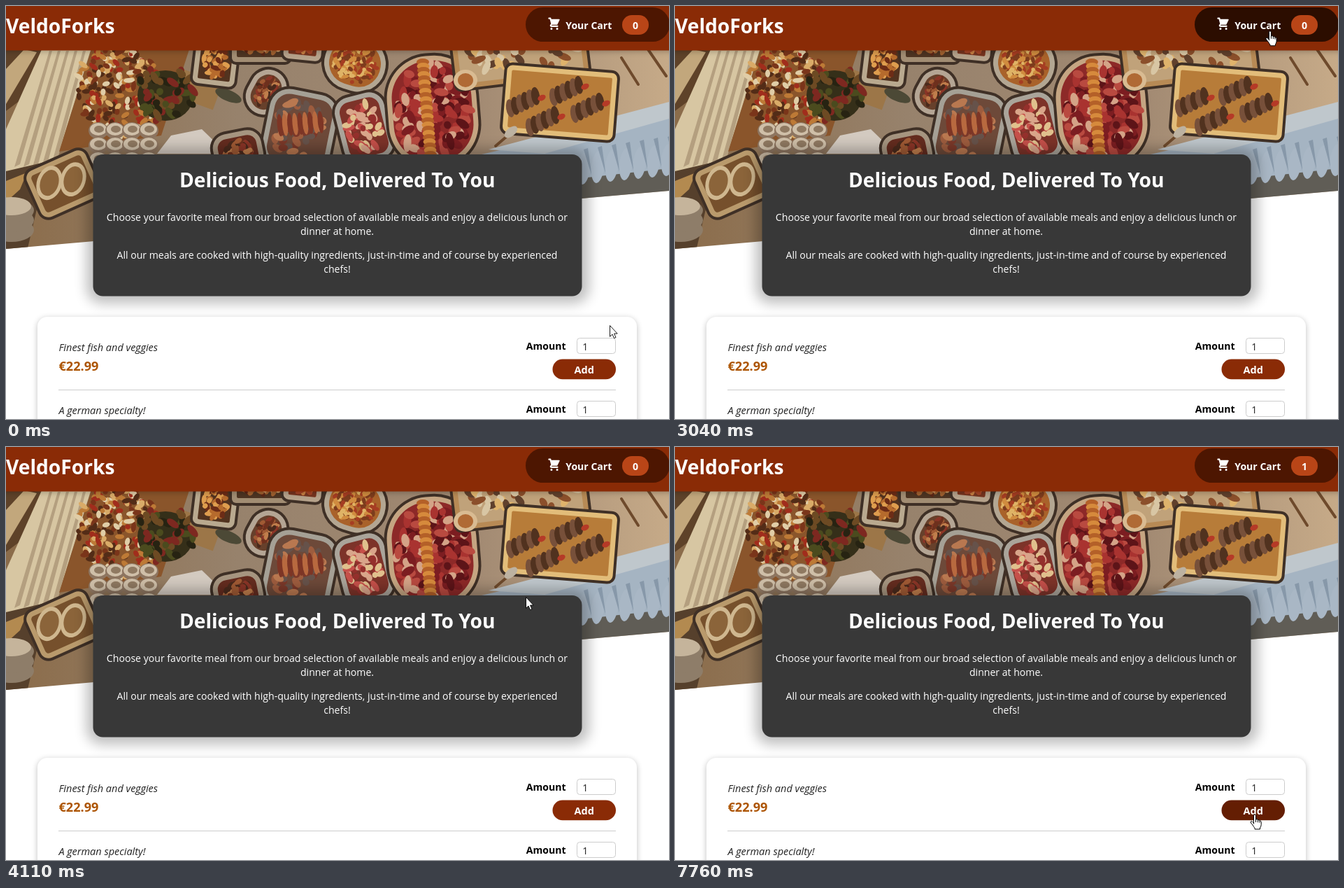
An HTML page with a canvas for the animation above (8 s loop, 948 px wide and 590 px high).

```html
<!DOCTYPE html>
<html lang="en">
<head>
<meta charset="utf-8">
<title>VeldoForks</title>
<style>
html, body { margin: 0; width: 100%; height: 100%; overflow: hidden; background: #fff; }
canvas, svg { position: absolute; left: 0; top: 0; width: 948px; height: 590px; }
text { font-family: "Open Sans", "Noto Sans", sans-serif; font-size: 14.08px; white-space: pre; }
.b { font-weight: 700; }
.mid { text-anchor: middle; }
.end { text-anchor: end; }
.desc { font-style: italic; font-size: 14.5px; fill: #222; }
.price { font-size: 18.1px; fill: #ad5502; }
.big { font-size: 28.2px; }
.w { fill: #fff; }
</style>
</head>
<body>
<canvas id="photo" width="948" height="590"></canvas>
<svg viewBox="0 0 948 590">
  <defs>
    <filter id="soft" x="-20%" y="-40%" width="140%" height="180%"><feGaussianBlur stdDeviation="9"/></filter>
    <filter id="thin" x="-10%" y="-50%" width="120%" height="200%"><feGaussianBlur stdDeviation="4"/></filter>
  </defs>

  <rect x="115" y="203" width="719" height="222" rx="22" opacity=".25" filter="url(#soft)"/>
  <rect x="124.5" y="212" width="699" height="202.5" rx="14" fill="#383838"/>
  <g class="w mid">
    <text class="b big" x="473.7" y="258.7">Delicious Food, Delivered To You</text>
    <text x="473.5" y="307.3">Choose your favorite meal from our broad selection of available meals and enjoy a delicious lunch or</text>
    <text x="473.5" y="326.8">dinner at home.</text>
    <text x="473.5" y="361.2">All our meals are cooked with high-quality ingredients, just-in-time and of course by experienced</text>
    <text x="473.5" y="380.8">chefs!</text>
  </g>

  <g id="meals">
    <rect x="45" y="446" width="857" height="220" rx="14" opacity=".25" filter="url(#thin)"/>
    <rect x="45" y="444" width="857" height="220" rx="14" fill="#fff"/>
    <g id="rows"></g>
    <path d="M75 548.5H872" stroke="#ccc"/>
    <g id="focus">
      <rect x="817" y="475" width="54" height="21" rx="4" fill="none" stroke="#101010" stroke-width="2"/>
      <path id="caret" d="M832.5 477V495" stroke="#000"/>
    </g>
    <g id="spin">
      <rect x="855" y="477" width="14" height="18" fill="#efefef"/>
      <rect id="half" x="855" y="477" width="14" height="9" fill="#cfcfcf"/>
      <path d="M858.5 483.5l3.5-4 3.5 4zM858.5 488.5l3.5 4 3.5-4z" fill="#505050"/>
    </g>
  </g>

  <rect x="-20" y="2" width="988" height="63" opacity=".25" filter="url(#thin)"/>
  <rect width="948" height="63.5" fill="#8a2b06"/>
  <text class="b big w" x="0" y="38.7">VeldoForks</text>
  <rect id="cart" x="743" y="2" width="206" height="49" rx="24.5"/>
  <path class="w" transform="translate(773.3 15.6) scale(1.02)" d="M3 1a1 1 0 0 0 0 2h1.2l1.7 6.7-.9.9C3.7 11.8 4.6 14 6.4 14H15a1 1 0 0 0 0-2H6.4l1-1H14a1 1 0 0 0 .9-.6l3-6A1 1 0 0 0 17 3H6.3L6 1.8A1 1 0 0 0 5 1zM16 16.5a1.5 1.5 0 1 1-3 0 1.5 1.5 0 0 1 3 0zM6.5 18a1.5 1.5 0 1 0 0-3 1.5 1.5 0 0 0 0 3z"/>
  <text class="b w" x="800.3" y="32.5">Your Cart</text>
  <rect x="881" y="13" width="38" height="28" rx="14" fill="#b94517"/>
  <text id="badge" class="b w mid" x="900" y="32.5">0</text>

  <g id="overlay">
    <rect width="948" height="590" opacity=".75"/>
    <g id="modal">
      <rect x="176.7" width="624.6" height="125.3" rx="14" fill="#fff"/>
      <text class="b" x="191.3" y="54" style="font-size:21.1px">Total Amount</text>
      <text class="b end" x="786.3" y="54" style="font-size:21.8px">$0.00</text>
      <rect id="close" x="689" y="74.5" width="97" height="35.5" rx="17.7" stroke="#8a2b06"/>
      <text id="closeText" class="mid" x="737.5" y="98.5">Close</text>
    </g>
  </g>

  <g id="mouse" stroke="#000" stroke-linejoin="round" fill="#fff">
    <path id="arrow" d="M.5 .5V16.3L4 13 6.5 18.6 9 17.5 6.6 12H11.2Z" stroke-width=".9"/>
    <path id="hand" transform="translate(-7 -.5)" d="M5.5 14V2Q5.5 .5 7 .5T8.5 2V8Q9 7 10.3 7.3 11.3 7.5 11.4 8.6 12 8 13 8.3 14 8.6 14 9.8 14.7 9.3 15.4 9.7 16.2 10 16.2 11.2V15Q16 18 14.5 19.5V21.5H7V20Q5.5 18 4 15.5L1.5 12.5Q.5 11 1.6 10.4 2.8 9.8 4 11L5.5 12.7M8.5 7.5V11.5M11.4 8.6V11.8M14 9.8V12.2"/>
  </g>
</svg>
<script>
const LOOP = 8000;
const $ = id => document.getElementById(id);
const show = (id, on) => $(id).setAttribute('visibility', on ? 'inherit' : 'hidden');

function row(y, desc, price, id) {
  return `<text class="desc" x="75.5" y="${y + 19.3}">${desc}</text>
    <text class="b price" x="75.5" y="${y + 47}">${price}</text>
    <text class="b" x="743.7" y="${y + 17.3}">Amount</text>
    <rect x="816.5" y="${y + .5}" width="55" height="22" rx="4" fill="#fff" stroke="#ccc"/>
    <text id="value${id}" x="824.3" y="${y + 17.5}" fill="#222">1</text>
    <rect id="add${id}" x="781.5" y="${y + 30.5}" width="90.5" height="28.7" rx="14.3" fill="#8a2b06"/>
    <text class="b mid w" x="826.7" y="${y + 50.5}" style="font-size:14.5px">Add</text>`;
}
$('rows').innerHTML = row(474, 'Finest fish and veggies', '€22.99', 1) +
  row(564, 'A german specialty!', '€16.50', 2);

function paintPhoto() {
  const c = $('photo').getContext('2d');
  let seed = 11;
  const rnd = () => (seed = (seed * 16807) % 2147483647) / 2147483647;
  const poly = (col, ...p) => {
    c.fillStyle = col;
    c.beginPath();
    for (let i = 0; i < p.length; i += 2) c.lineTo(p[i], p[i + 1]);
    c.fill();
  };
  const oval = (x, y, rx, ry, col, rot = 0) => {
    c.fillStyle = col;
    c.beginPath();
    c.ellipse(x, y, rx, ry, rot, 0, 7);
    c.fill();
  };
  const at = (x, y, rot, fn) => {
    c.save(); c.translate(x, y); c.rotate(rot); fn(); c.restore();
  };
  const bits = (rx, ry, n, size, cols) => {
    for (let i = 0; i < n; i++) {
      const a = rnd() * 6.28, r = Math.sqrt(rnd());
      oval(Math.cos(a) * r * rx, Math.sin(a) * r * ry, size * (.6 + rnd()), size * .7,
        cols[i % cols.length], rnd() * 3);
    }
  };
  const tray = (x, y, w, h, rot, round, rim, base, n, size, cols) => at(x, y, rot, () => {
    [['#3f3026', 4], [rim, 0], [base, -7]].forEach(([col, g]) => {
      c.fillStyle = col;
      c.beginPath();
      c.roundRect(-w / 2 - g, -h / 2 - g, w + 2 * g, h + 2 * g, Math.max(2, round + g));
      c.fill();
    });
    bits(w / 2 - 12, h / 2 - 12, n, size, cols);
  });

  poly('#fff', 0, 0, 948, 0, 948, 590, 0, 590);
  c.save();
  c.beginPath();
  [[0, 60], [948, 60], [948, 264], [0, 347]].forEach(p => c.lineTo(...p));
  c.clip();

  const cloth = c.createLinearGradient(0, 0, 948, 0);
  cloth.addColorStop(0, '#8b6c4a');
  cloth.addColorStop(.35, '#97826c');
  cloth.addColorStop(.7, '#a18972');
  cloth.addColorStop(1, '#c6aa88');
  poly(cloth, 0, 60, 948, 60, 948, 350, 0, 350);

  // left side: chairs, draped linen, plates
  poly('#5e4229', 0, 60, 70, 60, 40, 120, 0, 150);
  poly('#c2a77c', 0, 90, 26, 62, 44, 66, 0, 140);
  poly('#d7c6a2', 52, 60, 122, 60, 74, 214, 0, 246, 0, 176);
  for (let i = 0; i < 5; i++) poly('#b49f7f', 62 + i * 12, 64, 66 + i * 12, 64, 20 + i * 13, 226, 12 + i * 13, 230);
  poly('#56402c', 0, 236, 60, 222, 30, 350, 0, 350);
  poly('#b38a50', 0, 250, 30, 238, 20, 262, 0, 280);
  [320, 306, 292].forEach(y => oval(8, y, 32, 17, '#8e7d69'));
  oval(8, 286, 28, 13, '#c5b49b');

  // appetiser platter, vase and cups
  poly('#8a552b', 122, 62, 262, 62, 222, 185, 76, 208);
  at(164, 120, -.35, () => bits(62, 68, 230, 5, ['#bd7a36', '#7a351a', '#d9ab68', '#532c17', '#a12d1c', '#e0cda7']));
  at(276, 121, .35, () => { c.fillStyle = '#9c7648'; c.fillRect(-34, -21, 62, 40); });
  oval(228, 128, 40, 36, '#352f19');
  at(228, 124, 0, () => bits(42, 40, 60, 7, ['#4b4b1e', '#272312', '#6d4a23', '#7d2820']));
  for (let i = 0; i < 12; i++) {
    const x = 132 + i % 4 * 24, y = 178 + (i >> 2) * 21;
    oval(x, y, 14, 12, '#8d7560');
    oval(x, y - 2, 12, 9, '#cfbfa8');
    oval(x + 1, y - 2, 7, 5, '#8f7961');
  }
  poly('#d3cac0', 216, 211, 236, 185, 280, 176, 316, 211);
  oval(318, 128, 20, 8, '#4c4936', .4);

  // trays of food
  const meat = ['#a05a34', '#6e301d', '#c07e4c', '#4a2a1c', '#8a3527'];
  tray(82, 254, 92, 72, -.42, 12, '#b99a6c', '#76502c', 0, 0, []);
  [62, 96].forEach(x => { oval(x, 262 - x * .15, 18, 25, '#cfb78f', .3); oval(x, 262 - x * .15, 13, 19, '#8b643a', .3); });
  tray(300, 78, 60, 70, .12, 8, '#b9a98f', '#52331f', 60, 5, ['#b66b2d', '#de9d4e', '#6d2c16']);
  tray(364, 58, 82, 44, 0, 6, '#a28d73', '#4d3422', 45, 5, ['#a16130', '#d3a168', '#5c2616']);
  tray(425, 54, 54, 46, .1, 8, '#b6a28b', '#77341f', 25, 5, ['#a64325', '#c97f42']);
  tray(372, 123, 52, 66, .5, 28, '#b4a594', '#67402b', 55, 4, meat);
  tray(499, 82, 88, 78, .3, 38, '#b3a692', '#a9622a', 130, 4, ['#d08c3f', '#a63d22', '#dfb366', '#7d3c1d']);
  tray(420, 178, 98, 112, .2, 28, '#a5a095', '#6d4939', 50, 7, ['#9d5c3e', '#7b3829', '#b97850', '#66524a']);
  at(420, 172, .2, () => { for (let i = 0; i < 9; i++) oval(-28 + i * 7, 4 - i * 2, 4, 16, i % 2 ? '#b8693f' : '#7d3525', -.3); });
  tray(512, 174, 72, 96, -.25, 22, '#aaa49a', '#7d3329', 60, 6, ['#c6504a', '#d9a58a', '#94302c', '#e0c08d']);
  tray(332, 208, 70, 56, -.2, 20, '#a69580', '#642c1f', 50, 5, meat);
  tray(610, 150, 128, 158, -.08, 60, '#c5a582', '#8d2928', 150, 8, ['#a93330', '#7c1d21', '#b94a40', '#d4a387', '#5d1418']);
  for (let i = 0; i < 23; i++) oval(596 + i * .5, 80 + i * 6, 9, 5, i % 2 ? '#d68a3c' : '#b46028');
  tray(735, 70, 190, 76, -.12, 6, '#b78a55', '#c0a27a', 50, 7, ['#8b4f2b', '#dfb36c', '#60402c', '#d8c6a4']);
  oval(657, 106, 17, 15, '#d9bb92');
  oval(657, 106, 11, 10, '#b06a35');

  // blue linen and floor on the right
  poly('#605d56', 700, 225, 948, 165, 948, 290, 700, 300);
  poly('#a5b4c2', 680, 212, 948, 150, 948, 232, 822, 246, 760, 246);
  for (let i = 0; i < 7; i++) {
    oval(826 + i * 20, 232 - i * 2, 9, 23, '#a9b7c5', .1);
    poly('#8798a9', 826 + i * 20, 205 - i * 3, 832 + i * 20, 203 - i * 3, 838 + i * 20, 244 - i * 2);
  }
  poly('#bfc7cc', 690, 205, 948, 137, 948, 161, 770, 211);
  tray(792, 138, 158, 96, .08, 8, '#e2bd7a', '#b77c39', 0, 0, []);
  [[740, 137], [802, 121], [768, 164], [832, 145]].forEach(([x, y]) => at(x, y, -.45, () => {
    for (let i = 0; i < 6; i++) oval(-21 + i * 8, 0, 6, 13, i % 2 ? '#51321f' : '#77503a', .3);
    oval(26, 6, 6, 4, '#b53a27');
  }));
  c.lineCap = 'round';
  c.lineWidth = 4;
  c.strokeStyle = '#6e4a2c';
  [[880, 74, 904, 112], [918, 62, 944, 100], [700, 200, 728, 176]].forEach(([x, y, u, v]) => {
    c.beginPath(); c.moveTo(x, y); c.lineTo(u, v); c.stroke();
  });
  oval(722, 180, 11, 6, '#bdb2a1', -.7);
  c.restore();
}

// cubic-bezier(0, 0, .58, 1)
function easeOut(x) {
  if (x <= 0) return 0;
  if (x >= 1) return 1;
  let lo = 0, hi = 1, s;
  for (let i = 0; i < 24; i++) {
    s = (lo + hi) / 2;
    if (1.74 * (1 - s) * s * s + s ** 3 < x) lo = s; else hi = s;
  }
  return 3 * (1 - s) * s * s + s ** 3;
}

// time, x, y of the pointer tip
const path = [
  [60, 863, 456], [340, 486, 56], [2130, 553, 21], [2380, 650, 97], [2550, 735, 62],
  [2880, 850, 34], [3240, 852, 38], [3440, 815, 147], [3680, 747, 203], [4110, 743, 214],
  [4160, 743, 214], [4370, 761, 546], [4640, 862, 562], [4960, 863, 500], [5180, 862, 479],
  [5640, 862, 479], [5820, 862, 508], [6020, 862, 485], [6300, 862, 486], [6630, 862, 486],
  [7030, 829, 525]
];

function pointer(t) {
  let i = path.findIndex(p => p[0] > t);
  if (i === 0) return path[0].slice(1);
  if (i < 0) return path[path.length - 1].slice(1);
  const [t0, x0, y0] = path[i - 1], [t1, x1, y1] = path[i];
  const k = (t - t0) / (t1 - t0);
  return [x0 + (x1 - x0) * k, y0 + (y1 - y0) * k];
}

const within = (t, a, b) => t >= a && t < b;
const lastOf = (steps, t) => steps.filter(s => s[0] <= t).pop()[1];
const amounts = [[0, 1], [5190, 2], [5610, 3], [5700, 4], [6300, 3], [6390, 2], [6490, 1]];

function draw(t) {
  const [x, y] = pointer(t);
  const inBox = (l, top, r, b) => x >= l && x <= r && y >= top && y <= b;
  const open = within(t, 3202, 4105);
  const seen = !within(t, 355, 2130) && !within(t, 4375, 4640);

  const m = t < 1640 ? 1 : easeOut((t - 1640) / 1000);
  $('meals').setAttribute('opacity', m);
  $('meals').setAttribute('transform', `translate(0 ${45 * (1 - m)})`);

  const p = easeOut((t - 3202) / 300);
  show('overlay', open);
  $('modal').setAttribute('opacity', p);
  $('modal').setAttribute('transform', `translate(0 ${109.5 - 46 * (1 - p)})`);

  const onCart = seen && !open && inBox(743, 2, 948, 51);
  const onClose = open && inBox(689, 184, 786, 220);
  const onAdd = seen && !open && inBox(782, 505, 872, 533);
  const onInput = seen && !open && inBox(816, 474, 872, 497);
  $('cart').setAttribute('fill', onCart ? '#2c0d00' : '#4d1601');
  $('close').setAttribute('fill', onClose ? '#5a1a01' : '#fff');
  $('closeText').setAttribute('fill', onClose ? '#fff' : '#8a2b06');
  $('add1').setAttribute('fill', onAdd ? '#641e03' : '#8a2b06');

  const focused = within(t, 5190, 7490);
  show('focus', focused);
  show('caret', focused && !within(t, 6700, 7230));
  show('spin', focused || onInput);
  show('half', onInput && x > 855);
  $('half').setAttribute('y', y > 485 ? 486 : 477);
  $('value1').textContent = lastOf(amounts, t);
  $('badge').textContent = t < 7760 ? 0 : 1;

  const hand = onCart || onClose || onAdd;
  show('mouse', seen);
  show('hand', hand);
  show('arrow', !hand);
  $('mouse').setAttribute('transform', `translate(${x.toFixed(1)} ${y.toFixed(1)})`);
}

paintPhoto();
const start = performance.now();
function tick() {
  draw((performance.now() - start) % LOOP);
  requestAnimationFrame(tick);
}
tick();
</script>
</body>
</html>
```
